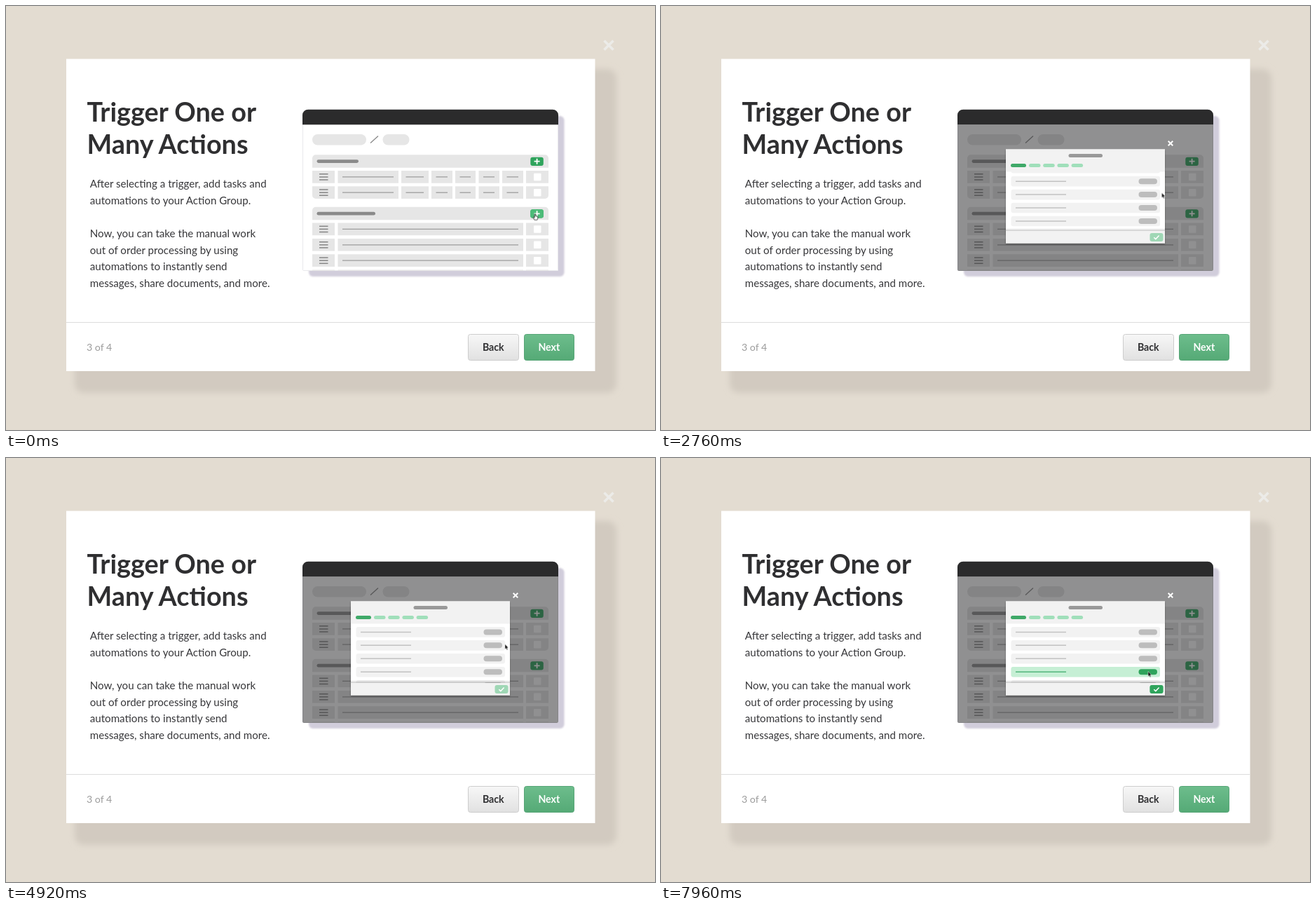
Write an HTML page that moves like this. It is 926 by 605 pixels and loops after 8000 ms.

```html
<!DOCTYPE html>
<html lang="en">
<head>
<meta charset="utf-8">
<title>Trigger One or Many Actions</title>
<style>
  html, body { margin: 0; width: 100%; height: 100%; overflow: hidden; background: #e3dcd1; }
  svg { display: block; width: 926px; height: 605px; font-family: Lato, sans-serif; }
  .heading { font-size: 37.8px; font-weight: 700; fill: #2f2f31; }
  .copy { font-size: 15.12px; fill: #37373a; }
  .step { font-size: 14.18px; fill: #9b9b9b; }
  .label { font-size: 14.18px; font-weight: 700; text-anchor: middle; }

  .anim { animation: 8s linear infinite; }
  #hover { animation-name: hover; animation-timing-function: step-end; }
  #veil { animation-name: open; }
  #dialog { animation-name: open; }
  #list { animation-name: scroll; animation-timing-function: ease-in-out; }
  #cursor { animation-name: move; animation-timing-function: ease-in-out; }
  #hand { animation-name: hand; animation-timing-function: step-end; }
  #arrow { animation-name: arrow; animation-timing-function: step-end; }
  .picked { animation-name: pick; }

  @keyframes hover { 0% { opacity: 1 } 7% { opacity: 0 } }
  @keyframes open { 0%, 5% { opacity: 0 } 9%, 100% { opacity: 1 } }
  @keyframes scroll {
    0%, 21% { transform: translateY(0) }
    32%, 42% { transform: translateY(-93px) }
    52.9%, 100% { transform: translateY(0) }
  }
  @keyframes move {
    0%, 7% { transform: translate(755px, 296.5px) }
    15%, 16.5% { transform: translate(728.5px, 283px) }
    21%, 59% { transform: translate(714.5px, 266.5px) }
    68%, 72% { transform: translate(698.5px, 261px) }
    82%, 89% { transform: translate(694px, 299.5px) }
    94%, 100% { transform: translate(695px, 304.5px) }
  }
  @keyframes hand { 0% { opacity: 1 } 8% { opacity: 0 } 79% { opacity: 1 } 91% { opacity: 0 } }
  @keyframes arrow { 0% { opacity: 0 } 8% { opacity: 1 } 79% { opacity: 0 } 91% { opacity: 1 } }
  @keyframes pick { 0%, 88% { opacity: 0 } 90.5%, 100% { opacity: 1 } }
</style>
</head>
<body>
<svg viewBox="0 0 926 605">
  <defs>
    <filter id="soft" x="-5%" y="-5%" width="110%" height="110%"><feGaussianBlur stdDeviation="4"/></filter>
    <filter id="faint" x="-5%" y="-10%" width="110%" height="120%"><feGaussianBlur stdDeviation="1"/></filter>
    <linearGradient id="green" x2="0" y2="1">
      <stop stop-color="#6dbd8c"/><stop offset="1" stop-color="#55aa76"/>
    </linearGradient>
    <linearGradient id="grey" x2="0" y2="1">
      <stop stop-color="#f7f7f7"/><stop offset="1" stop-color="#e1e1e1"/>
    </linearGradient>
    <linearGradient id="lip" x2="0" y2="1">
      <stop stop-color="#000" stop-opacity="0"/><stop offset="1" stop-color="#000" stop-opacity=".2"/>
    </linearGradient>
    <clipPath id="window"><path d="M423 380V155.7a8 8 0 0 1 8-8H780a8 8 0 0 1 8 8V376a2 2 0 0 1-2 2H425a2 2 0 0 1-2-2Z"/></clipPath>
    <clipPath id="listArea"><rect x="492" y="236.5" width="227" height="84.5"/></clipPath>
  </defs>

  <rect width="926" height="605" fill="#e3dcd1"/>
  <rect x="98" y="90" width="773" height="462" rx="13" fill="#d2cac0" filter="url(#soft)"/>
  <rect x="86" y="75.5" width="754.5" height="445.5" fill="#fff"/>
  <path d="M853.5 49.5l13 13m0-13l-13 13" stroke="#ecebe8" stroke-width="3.6"/>

  <g class="heading">
    <text x="115.5" y="165">Trigger One or</text>
    <text x="115.5" y="210.5">Many Actions</text>
  </g>
  <g class="copy" id="copy"></g>

  <path d="M86 451.5H840.5" stroke="#dcdcdc"/>
  <text class="step" x="115" y="492">3 of 4</text>
  <rect x="659.5" y="468.5" width="72" height="37" rx="3" fill="url(#grey)" stroke="#cdcdcd"/>
  <text class="label" x="695.3" y="492" fill="#2f2f31">Back</text>
  <rect x="739.5" y="468.5" width="71" height="37" rx="3" fill="url(#green)" stroke="#57a577"/>
  <text class="label" x="774.8" y="492" fill="#fff">Next</text>

  <rect x="432" y="157" width="364.5" height="229" rx="6" fill="#d1cddb" filter="url(#faint)"/>
  <g clip-path="url(#window)">
    <rect x="423" y="147" width="365" height="231" fill="#fff"/>
    <path d="M423.5 169V377.5H787.5V169" fill="none" stroke="#e9e9ec"/>
    <rect x="423" y="147" width="365" height="22.3" fill="#2b2b2c"/>
    <g id="board"></g>
    <rect id="veil" class="anim" x="423" y="169.3" width="365" height="209" fill="#2b2b2c" fill-opacity=".52"/>
  </g>

  <g id="dialog" class="anim">
    <path d="M723.7 192.7l6.6 6.6m0-6.6l-6.6 6.6" stroke="#fff" stroke-width="2"/>
    <rect x="492" y="206" width="227" height="134" fill="#000" opacity=".35" filter="url(#faint)"/>
    <rect x="492" y="204.5" width="227" height="134" fill="#fff"/>
    <rect x="492" y="204.5" width="227" height="32" fill="#f2f2f2"/>
    <g id="tabs"></g>
    <g clip-path="url(#listArea)"><g id="list" class="anim"></g></g>
    <rect x="492" y="317" width="227" height="4" fill="url(#lip)"/>
    <rect x="492" y="321" width="227" height="17.5" fill="#f2f2f2"/>
    <rect x="697.5" y="324" width="19" height="12" rx="3" fill="#9fd7b5"/>
    <rect class="anim picked" x="697.5" y="324" width="19" height="12" rx="3" fill="#2fa45c"/>
    <path d="M703.3 330.2l2.5 2.4 4.8-5" fill="none" stroke="#fff" stroke-width="1.5"/>
  </g>

  <g id="cursor" class="anim">
    <path id="arrow" class="anim" d="M0 0V7.2L1.6 5.8 2.7 8.3 4 7.7 2.9 5.3H5Z" fill="#111" stroke="#fff" stroke-width=".5"/>
    <path id="hand" class="anim" d="M-.8 .7Q0-.5 .8 .7V3.2L3.8 4V6.5L2.8 8.8H-.9L-3 5.2Q-2.6 4.2-.8 5.5Z" fill="#fff" stroke="#222" stroke-width=".8"/>
  </g>
</svg>
<script>
  const rect = (x, y, w, h, fill, r = 0, extra = '') =>
    `<rect x="${x}" y="${y}" width="${w}" height="${h}" rx="${r}" fill="${fill}" ${extra}/>`;
  const line = (x1, x2, y, color, width) =>
    `<path d="M${x1} ${y}H${x2}" stroke="${color}" stroke-width="${width}"/>`;
  const fill = (id, html) => document.getElementById(id).innerHTML = html;

  const PALE = '#e6e6e6', GREEN = '#2fa45c';
  const NARROW = [[473.5, 560], [564, 603], [607, 637], [641, 670], [674.5, 704], [708, 738]];
  const WIDE = [[473.5, 738]];

  function boardRow(y, cells, last) {
    const height = 17.7;
    let out = last
      ? `<path d="M437 ${y}h32v${height}h-27a5 5 0 0 1-5-5Z M742 ${y}h32v${height - 5}a5 5 0 0 1-5 5h-27Z" fill="${PALE}"/>`
      : rect(437, y, 32, height, PALE) + rect(742, y, 32, height, PALE);
    for (const dy of [4.8, 8.9, 13]) out += line(447, 459.5, y + dy, '#858585', 1.5);
    for (const [a, b] of cells)
      out += rect(a, y, b - a, height, PALE) + line(a + 6.5, b - 7, y + 8.9, '#9c9c9c', 1.3);
    return out + rect(753, y + 3.7, 10.5, 10.5, '#fff', 1);
  }

  function groupHead(y, lineEnd, hovered) {
    const plus = `<path d="M753.6 ${y + 9.5}h8m-4-4v8" stroke="#fff" stroke-width="1.8"/>`;
    const button = (color, extra) => rect(748.3, y + 3.5, 18.5, 12.2, color, 3, extra);
    return `<path d="M437 ${y + 18.5}v-13.5a5 5 0 0 1 5-5h327a5 5 0 0 1 5 5v13.5Z" fill="${PALE}"/>`
      + rect(443.5, y + 7, lineEnd - 443.5, 4.8, '#8a8a8a', 2.4)
      + button(GREEN)
      + (hovered ? button('#4cbb78', 'id="hover" class="anim"') : '')
      + plus;
  }

  fill('board',
    rect(437, 183, 77, 15.5, PALE, 7.7) + rect(537.5, 183, 38, 15.5, PALE, 7.7)
    + '<path d="M520 195.5L531 185.5" stroke="#858585" stroke-width="1.2"/>'
    + groupHead(212.2, 503) + boardRow(235, NARROW) + boardRow(257.3, NARROW, true)
    + groupHead(286.8, 527, true)
    + [309.5, 331.9, 354.3, 376.4].map(y => boardRow(y, WIDE)).join(''));

  fill('tabs',
    rect(581.5, 211, 48.5, 5, '#999', 2.5) + rect(499, 225, 22, 5, '#3fa968', 2.5)
    + [0, 1, 2, 3].map(i => rect(525 + i * 20.2, 225, 16.5, 5, '#a0dfba', 2.5)).join(''));

  const listRow = (y, back, stroke, pill) =>
    rect(499.5, y, 212.5, 14.6, back, 3) + line(506, 578, y + 7.3, stroke, 1.5)
    + rect(681.5, y + 3.3, 26.5, 8, pill, 4);

  let rows = '';
  for (let i = 0; i < 9; i++) rows += listRow(241.1 + i * 18.95, '#f2f2f2', '#c2c2c2', '#bdbdbd');
  rows += `<g class="anim picked">${listRow(241.1 + 3 * 18.95, '#c6efd5', '#52b67b', GREEN)}</g>`;
  fill('list', rows);

  const copy = [
    'After selecting a trigger, add tasks and',
    'automations to your Action Group.',
    '',
    'Now, you can take the manual work',
    'out of order processing by using',
    'automations to instantly send',
    'messages, share documents, and more.'
  ];
  fill('copy', copy.map((text, i) => `<text x="119.8" y="${259 + i * 23.63}">${text}</text>`).join(''));
</script>
</body>
</html>
```
